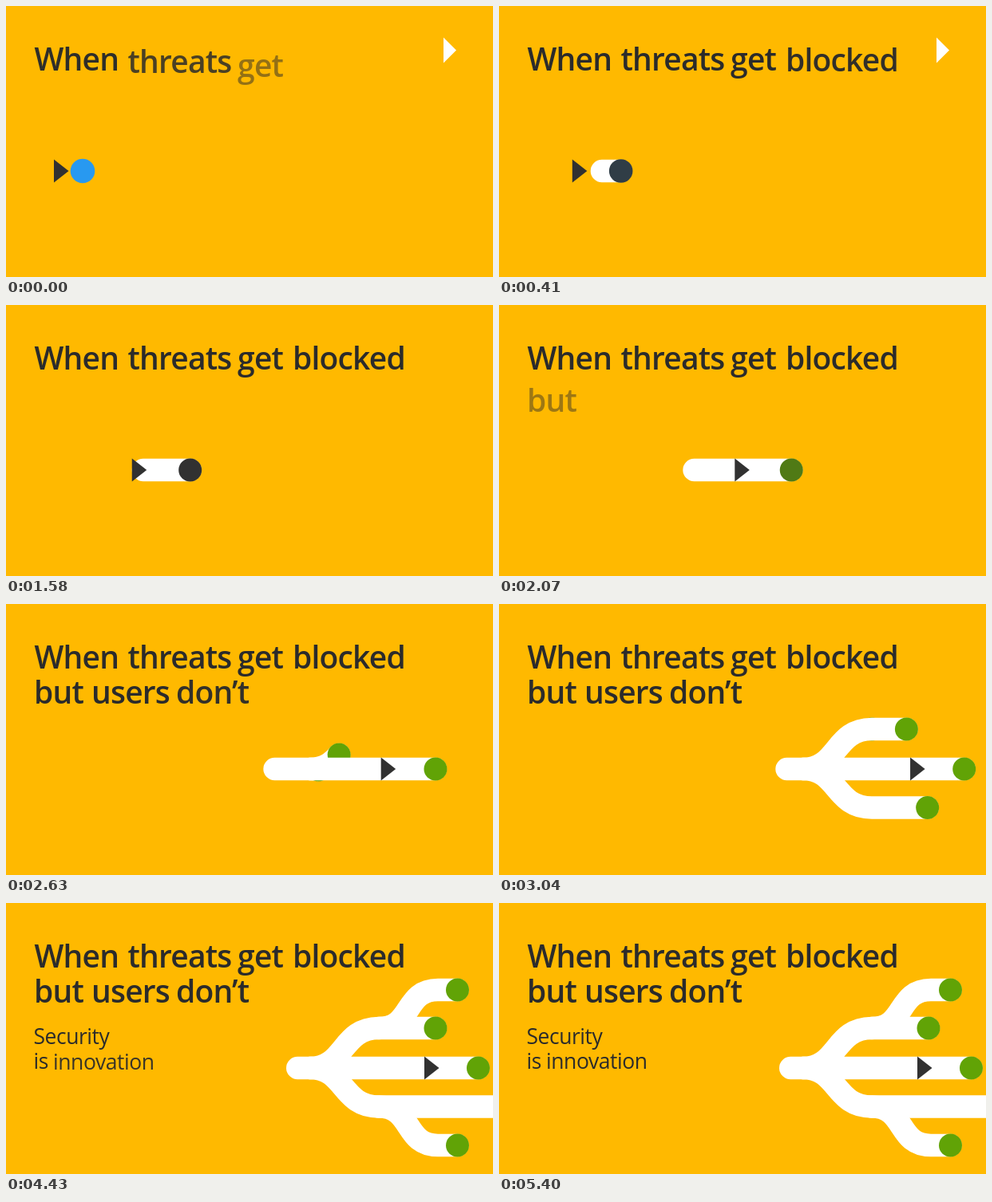
Recreate the animation shown at these times as an HTML page. Size 610 by 340 pixels, loop 5.47 s.

```html
<!DOCTYPE html>
<html lang="en">
<head>
<meta charset="utf-8">
<title>Security is innovation</title>
<style>
  html, body { margin: 0; width: 100%; height: 100%; overflow: hidden; background: #ffb900; }
  svg { display: block; width: 610px; height: 340px; }
  text { font-family: "Open Sans", "Noto Sans", sans-serif; fill: #2b2b2b; }
  .big { font-size: 39px; font-weight: 600; letter-spacing: -0.8px; }
  .small { font-size: 26.5px; font-weight: 400; letter-spacing: -0.45px; }
  .arm { fill: none; stroke: #fff; stroke-width: 28.5; stroke-linecap: round; }
</style>
</head>
<body>
<svg id="stage" viewBox="0 0 610 340"></svg>
<script>
const LOOP = 5470;
const DARK = [49, 49, 49], GREEN = [97, 163, 6], BLUE = [40, 153, 240];
const MID_Y = 207, R = 14.5;
const stage = document.getElementById('stage');

function add(tag, attrs) {
  const el = document.createElementNS('http://www.w3.org/2000/svg', tag);
  set(el, attrs);
  stage.append(el);
  return el;
}
function set(el, attrs) {
  for (const key in attrs) el.setAttribute(key, attrs[key]);
}

const lerp = (a, b, p) => a + (b - a) * p;
const span = (t, start, length) => Math.min(1, Math.max(0, (t - start) / length));
const inOut = (u, k) => u < 0.5 ? (2 * u) ** k / 2 : 1 - (2 - 2 * u) ** k / 2;
const outCubic = u => 1 - (1 - u) ** 3;
const rgb = c => `rgb(${c.map(Math.round)})`;
const mix = (a, b, p) => rgb(a.map((v, i) => lerp(v, b[i], p)));

// Each word: text, class, x, baseline, start time
const words = [
  ['When', 'big', 35.5, 81, -376],
  ['threats', 'big', 152.5, 81, -231],
  ['get', 'big', 290, 81, -86],
  ['blocked', 'big', 359, 81, 59],
  ['but', 'big', 35, 124.5, 1996],
  ['users', 'big', 107, 124.5, 2141],
  ['don’t', 'big', 213, 124.5, 2286],
  ['Security', 'small', 34.5, 177, 3840],
  ['is', 'small', 34.5, 208, 3985],
  ['innovation', 'small', 59, 208, 4130]
].map(([label, cls, x, y, start]) => {
  const el = add('text', { class: cls, x, y });
  el.textContent = label;
  return { el, y, start };
});

// Outer arms come first so that the inner arms cover their roots
const arms = [
  ['M467 157C510 157 498 109 541 109H565.5', 3032, 900],
  ['M467 255.5C510 255.5 498 304 541 304H565.5', 3133, 950],
  ['M381 207C425 207 420 157 467 157H538', 2250, 1100],
  ['M381 207C425 207 420 255.5 467 255.5H650', 2500, 975]
].map(([d, start, length]) => {
  const path = add('path', { class: 'arm', d });
  const dot = add('circle', { r: R, fill: rgb(GREEN) });
  return { path, dot, start, length, total: path.getTotalLength() };
});

const bar = add('rect', { y: MID_Y - 14.25, height: 28.5, rx: 14.25, fill: '#fff' });
const head = add('circle', { cy: MID_Y });
const arrow = add('path', { d: 'M0 192.5L18.5 207L0 221.5Z', fill: rgb(DARK) });
const corner = add('path', { d: 'M548 39.5L564 55.5L548 71.5Z', fill: '#fff' });

function draw(t) {
  for (const w of words) {
    const p = outCubic(span(t, w.start, 550));
    set(w.el, { opacity: p ** 0.75, y: w.y + 14 * (1 - p) });
  }

  for (const a of arms) {
    const u = span(t, a.start, a.length);
    const run = a.total * inOut(u, 2);
    const end = a.path.getPointAtLength(run);
    const visibility = u > 0 ? 'visible' : 'hidden';
    set(a.path, { visibility, 'stroke-dasharray': `${run} 999` });
    set(a.dot, { visibility, cx: end.x, cy: end.y });
  }

  // The switch opens, then stretches across the stage
  const open = inOut(span(t, 0, 700), 2);
  const run = inOut(span(t, 703, 2834), 3);
  const place = (a, b, c) => lerp(a, b, open) + (c - b) * run;
  const left = place(82, 131.6, 351);
  const x = place(96, 182, 591.5);
  set(bar, { x: left, width: x + 14.25 - left });
  set(head, {
    cx: x,
    r: lerp(15.3, R, open),
    fill: t < 1000 ? mix(BLUE, DARK, span(t, 100, 350)) : mix(DARK, GREEN, span(t, 1750, 500))
  });
  set(arrow, { transform: `translate(${place(60, 108.3, 524)} 0)` });
  set(corner, { visibility: t < 650 ? 'visible' : 'hidden' });
}

const begin = performance.now();
function tick() {
  draw((performance.now() - begin) % LOOP);
  requestAnimationFrame(tick);
}
tick();
</script>
</body>
</html>
```
